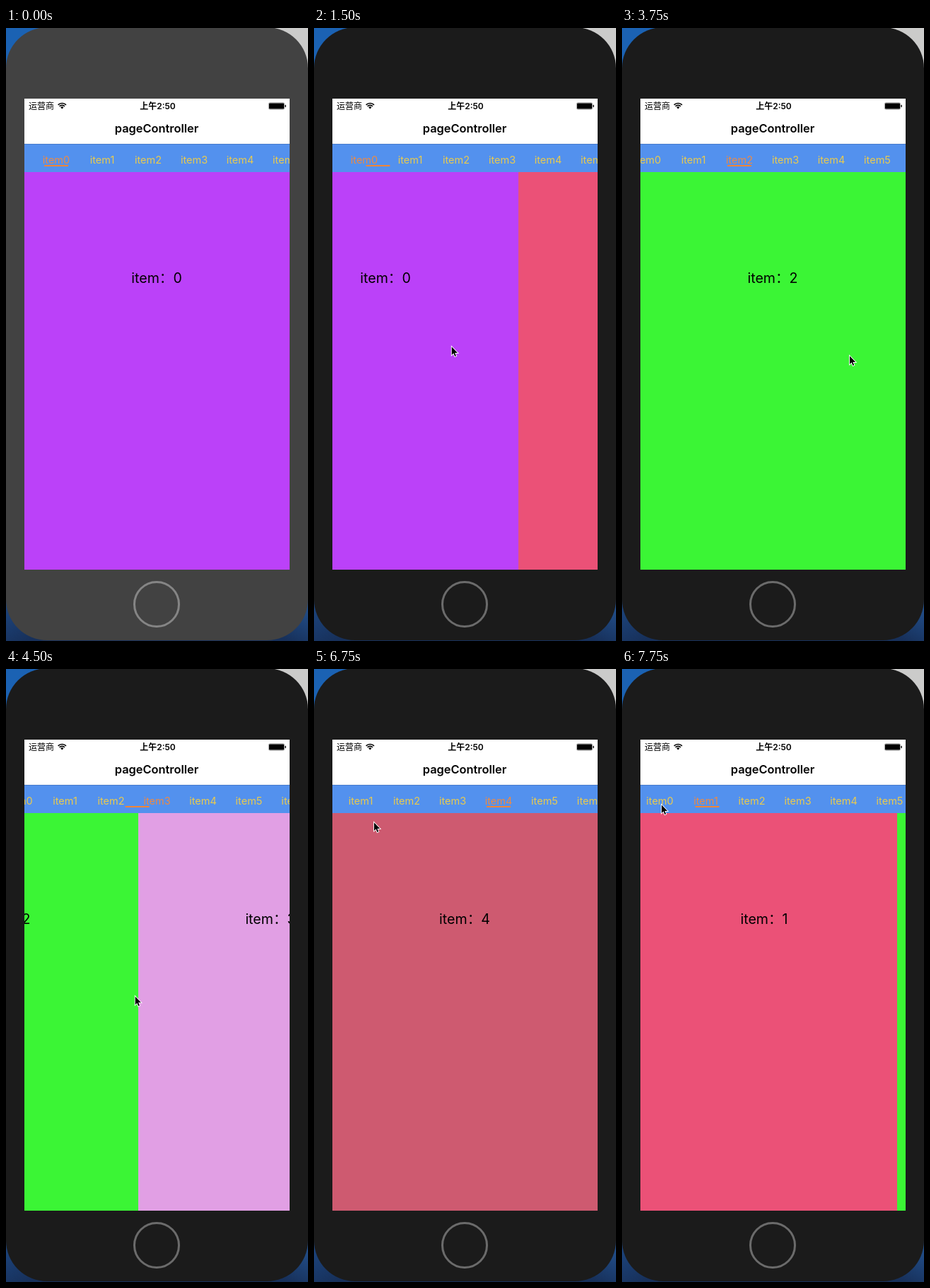
Write an HTML page with a canvas that moves like this. It is 427 by 868 pixels and loops after 8000 ms.

```html
<!DOCTYPE html>
<html lang="zh-CN">
<head>
<meta charset="utf-8">
<style>
html, body { margin: 0; height: 100%; overflow: hidden; }
canvas { display: block; }
</style>
</head>
<body>
<canvas id="stage" width="427" height="868"></canvas>
<script>
const ctx = document.getElementById('stage').getContext('2d');
const LOOP = 8000, STEP = 250;
const LEFT = 26, TOP = 100, WIDTH = 375, HEIGHT = 667;
const PAGE_COLORS = ['#bb41f9', '#eb5177', '#3bf535', '#e19fe4', '#ce5a70'];
const FONT = 'Inter, "Noto Sans CJK SC", "Noto Sans CJK", sans-serif';

// Four evenly spaced swipes, then a tap on the second tab.
const SWIPES = 4, FIRST_SWIPE = 1250, SWIPE_GAP = 1436, SWIPE_TIME = 690;
const DRAG_TIME = 350, DRAG_LENGTH = 140, RETURN_TIME = 700;
const TAP_START = 7374, TAP_TIME = 400;
const GRABS = [[306, 449], [310, 458], [321, 462], [336, 316], [84, 215]];
const TAP_POINT = [55, 190];

const lerp = (a, b, u) => a + (b - a) * u;

// Eased progress from 0 to 1.
function progress(t, start, duration) {
  const u = Math.min(1, Math.max(0, (t - start) / duration));
  return u * u * (3 - 2 * u);
}

const swipeStart = i => FIRST_SWIPE + SWIPE_GAP * i;

function pageAt(t) {
  let page = -3 * progress(t, TAP_START, TAP_TIME);
  for (let i = 0; i < SWIPES; i++) page += progress(t, swipeStart(i), SWIPE_TIME);
  return page;
}

function pointerAt(t) {
  let [x, y] = GRABS[0];
  y += 60 * (1 - progress(t, STEP, FIRST_SWIPE - STEP));
  for (let i = 0; i < SWIPES; i++) {
    const start = swipeStart(i), back = progress(t, start + DRAG_TIME, RETURN_TIME);
    x -= DRAG_LENGTH * progress(t, start, DRAG_TIME);
    x = lerp(x, GRABS[i + 1][0], back);
    y = lerp(y, GRABS[i + 1][1], back);
  }
  const toTap = progress(t, 6750, 500);
  return [lerp(x, TAP_POINT[0], toTap), lerp(y, TAP_POINT[1], toTap)];
}

function rect(x, y, w, h, color) {
  ctx.fillStyle = color;
  ctx.fillRect(x, y, w, h);
}

function roundRect(x, y, w, h, r, color) {
  ctx.fillStyle = color;
  ctx.beginPath();
  ctx.roundRect(x, y, w, h, r);
  ctx.fill();
}

function text(str, x, y, size, color = '#000', weight = 400, align = 'center') {
  ctx.font = `${weight} ${size}px ${FONT}`;
  ctx.textAlign = align;
  ctx.fillStyle = color;
  ctx.fillText(str, x, y);
}

function gradient(x1, y1, x2, y2, from, to) {
  const fill = ctx.createLinearGradient(x1, y1, x2, y2);
  fill.addColorStop(0, from);
  fill.addColorStop(1, to);
  return fill;
}

function drawPhone(active) {
  rect(0, 0, 214, 434, '#1b62b3');
  rect(214, 0, 213, 434, '#cbcbca');
  rect(0, 434, 214, 434, gradient(0, 815, 30, 868, '#1d4680', '#17305a'));
  rect(214, 434, 213, 434, gradient(427, 815, 400, 868, '#235290', '#17305a'));
  roundRect(0, -1, 427, 868, 58, active ? '#1b1b1b' : '#424242');
  ctx.strokeStyle = active ? '#6b6b6b' : '#858585';
  ctx.lineWidth = 3;
  ctx.beginPath();
  ctx.arc(213, 816, 31.5, 0, 7);
  ctx.stroke();
}

function drawWifi(x, y) {
  const from = -Math.PI * .75, to = -Math.PI * .25;
  ctx.strokeStyle = ctx.fillStyle = '#000';
  ctx.lineWidth = 1.7;
  for (const r of [8, 5.2]) {
    ctx.beginPath();
    ctx.arc(x, y, r, from, to);
    ctx.stroke();
  }
  ctx.beginPath();
  ctx.moveTo(x, y);
  ctx.arc(x, y, 3, from, to);
  ctx.fill();
}

function drawBattery() {
  ctx.strokeStyle = '#666';
  ctx.lineWidth = .6;
  ctx.beginPath();
  ctx.roundRect(371.3, 105.8, 22.4, 9.4, 2);
  ctx.stroke();
  roundRect(372, 106.5, 21, 8, 1, '#000');
  roundRect(394.4, 108.8, 1.4, 3.4, 1, '#000');
}

function drawHeader() {
  rect(LEFT, TOP, WIDTH, 64, '#fff');
  text('运营商', 32, 114.5, 12, '#000', 400, 'left');
  drawWifi(79.3, 114.5);
  text('上午2:50', 214.5, 114.5, 12, '#000', 600);
  drawBattery();
  text('pageController', 213, 148, 16.4, '#000', 600);
}

function drawTabs(page) {
  const selected = Math.round(page), scroll = 17.5 * selected;
  rect(LEFT, 164, WIDTH, 40, '#5391ee');
  rect(LEFT, 164, WIDTH, .5, 'rgba(0, 0, 0, .3)');
  for (let i = 0; i < 7; i++)
    text('item' + i, 71 + 65 * i - scroll, 192, 14.5, i === selected ? '#ee8a43' : '#e9ca4e');
  rect(54 + 65 * page - scroll, 194, 34, 2, '#f08536');
}

function drawPages(page) {
  PAGE_COLORS.forEach((color, i) => {
    const x = Math.round(LEFT + (i - page) * WIDTH);
    rect(x, 204, WIDTH, 563, color);
    text('item：' + i, x + 187, 361, 19.6);
  });
}

const arrow = new Path2D('M1 2.4V14L3.6 11.6 5.5 16 7.2 15.3 5.4 11H9.2Z');
function drawPointer(x, y) {
  ctx.save();
  ctx.translate(x, y);
  ctx.lineWidth = 1.8;
  ctx.strokeStyle = '#fff';
  ctx.stroke(arrow);
  ctx.fillStyle = '#000';
  ctx.fill(arrow);
  ctx.restore();
}

function draw(now) {
  // The picture refreshes four times a second.
  const t = Math.floor(now % LOOP / STEP) * STEP;
  const active = t >= STEP, page = pageAt(t);
  drawPhone(active);
  ctx.save();
  ctx.beginPath();
  ctx.rect(LEFT, TOP, WIDTH, HEIGHT);
  ctx.clip();
  drawPages(page);
  drawHeader();
  drawTabs(page);
  ctx.restore();
  if (active) drawPointer(...pointerAt(t));
}

let start;
function frame() {
  const now = performance.now();
  start ??= now;
  draw(now - start);
  requestAnimationFrame(frame);
}
frame();
</script>
</body>
</html>
```
